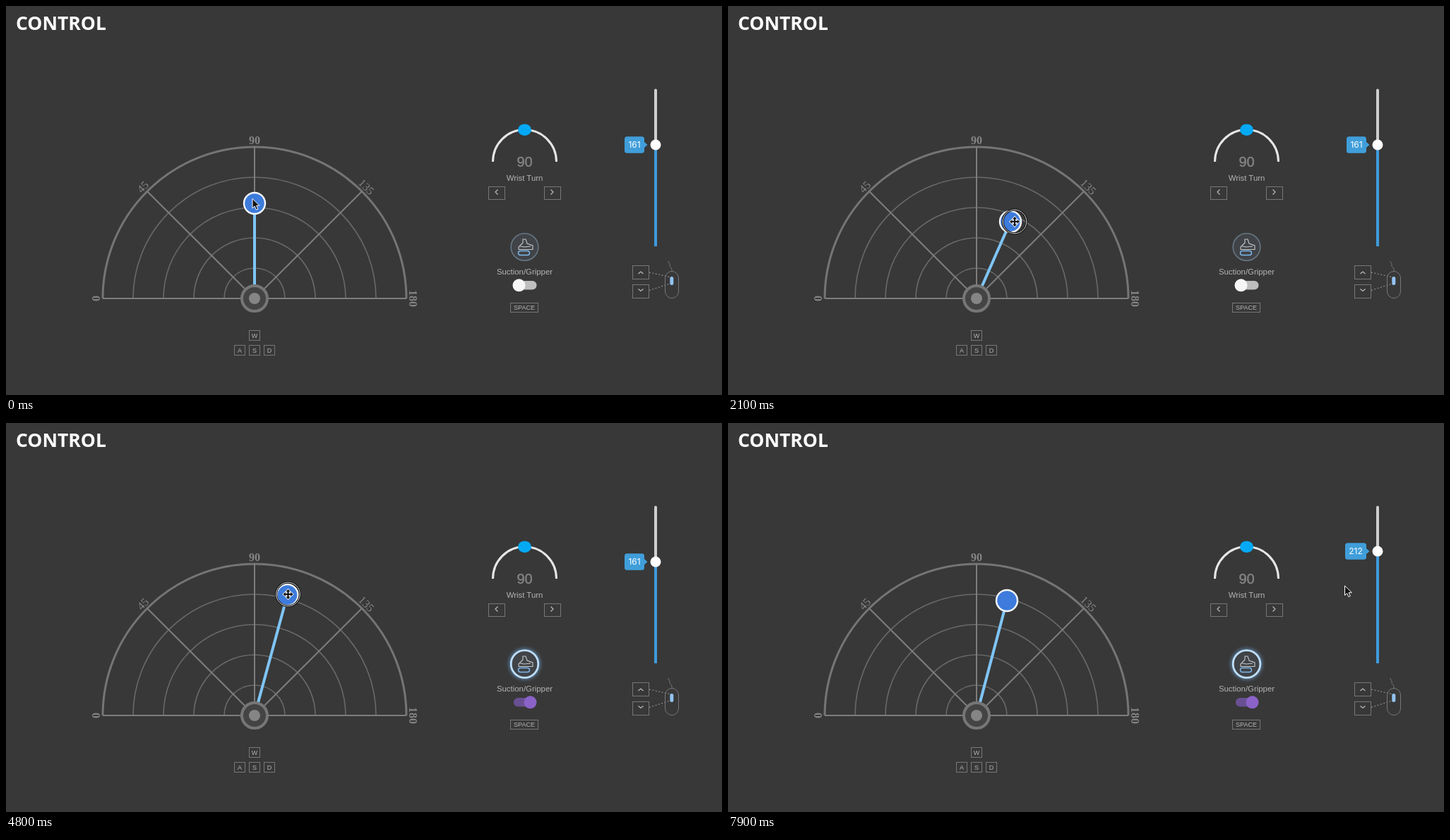
These frames come from a looping animation (1014x552 px, 8000 ms). An HTML page:

```html
<!DOCTYPE html>
<html lang="en">
<head>
<meta charset="utf-8">
<title>Control</title>
<style>
  html, body { margin: 0; width: 100%; height: 100%; overflow: hidden; background: #383838; }
  svg { display: block; width: 1014px; height: 552px; }
  text { text-anchor: middle; font-family: "Liberation Sans", Arial, sans-serif; fill: #b4b4b4; }
  .title { font: bold 26.5px "Open Sans", "Noto Sans", sans-serif; fill: #fff; text-anchor: start; }
  .degrees text { font: bold 16px "Liberation Serif", Times, serif; fill: #858585; }
  .label { font-size: 11.4px; }
  .key { font-size: 9px; }
  .line { fill: none; stroke: #777; }
  .chevron { fill: none; stroke: #bbb; stroke-width: 1.2; }
</style>
</head>
<body>
<svg viewBox="0 0 1014 552">
  <defs>
    <radialGradient id="backdrop" gradientUnits="userSpaceOnUse" r="1"
      gradientTransform="translate(540 395) scale(640 430)">
      <stop offset="0" stop-color="#4c4c4c"/>
      <stop offset=".25" stop-color="#494949"/>
      <stop offset=".57" stop-color="#414141"/>
      <stop offset="1" stop-color="#383838"/>
    </radialGradient>
    <filter id="glow" x="-50%" y="-50%" width="200%" height="200%">
      <feGaussianBlur stdDeviation="2.5"/>
    </filter>
  </defs>
  <rect width="1014" height="552" fill="url(#backdrop)"/>
  <text class="title" x="14" y="34">CONTROL</text>

  <g id="dial" class="line"></g>
  <g class="degrees">
    <text x="352" y="196">90</text>
    <text transform="translate(194 257) rotate(-45)" y="5" style="font-weight:400">45</text>
    <text transform="translate(510 257) rotate(45)" y="5" style="font-weight:400">135</text>
    <text transform="translate(128 415) rotate(-90)" y="5">0</text>
    <text transform="translate(576 415) rotate(90)" y="5">180</text>
  </g>
  <line id="arm" x1="352" y1="415" stroke="#7fc5f6" stroke-width="4"/>
  <circle cx="352" cy="415" r="18" fill="#444" stroke="#767676" stroke-width="4"/>
  <circle cx="352" cy="415" r="8" fill="#858585"/>
  <circle id="knob" r="15" fill="#3d7bdc" stroke="#f4f7fb" stroke-width="2.4"/>
  <g id="keys"></g>

  <path d="M689.5 221a45 45.5 0 0 1 90 0" fill="none" stroke="#e6e6e6" stroke-width="3"/>
  <ellipse cx="734.5" cy="175.7" rx="9.5" ry="8.3" fill="#04a9f6"/>
  <text x="734.5" y="228" font-size="20" style="fill:#858585" stroke="#858585" stroke-width=".4">90</text>
  <text class="label" x="734.5" y="247.5">Wrist Turn</text>
  <path class="chevron" d="M696.5 260.5l-3.5 3.5 3.5 3.5M771.5 260.5l3.5 3.5-3.5 3.5"/>

  <circle id="halo" cx="734.5" cy="342" r="20" fill="none" stroke="#78b4ee" stroke-width="4" filter="url(#glow)"/>
  <circle id="badge" cx="734.5" cy="342" r="19.3" fill="#404347"/>
  <path d="M726 346v-4l6-6v-5h4l2 6 8 3v5.500h-20M728 341l6 1 9-1" fill="none" stroke="#c9c9c9" stroke-width="1.1"/>
  <rect x="725.5" y="347.500" width="16" height="6" rx="3" fill="#404347" stroke="#7db9ee" stroke-width="1.4"/>
  <text class="label" x="734.5" y="381">Suction/Gripper</text>
  <rect id="track" y="390" width="31" height="12.500" rx="6.2"/>
  <circle id="thumb" cy="396.300" r="9"/>

  <path d="M920 119.500V339" stroke="#cfcfcf" stroke-width="4" stroke-linecap="round"/>
  <path id="level" stroke="#3f9bdc" stroke-width="4"/>
  <circle id="handle" cx="920" r="7.500" fill="#fff"/>
  <g id="bubble">
    <rect id="bubbleBox" y="-11.700" height="23.400" rx="3.500" fill="#409eda"/>
    <path d="M903.500-4.500l5 4.500-5 4.500z" fill="#409eda"/>
    <text id="value" y="4.400" style="font:12px Inter,Arial,sans-serif;fill:#fff"></text>
  </g>
  <path class="chevron" d="M895.500 380l3.500-3 3.500 3M895.500 401.500l3.500 3 3.500-3"/>
  <path d="M911 378l29 6.500M911 403.500l28-9" stroke="#a0a0a0" stroke-dasharray="2 2.500" fill="none"/>
  <rect class="line" x="933.500" y="376.500" width="19" height="38" rx="9.500"/>
  <path class="line" d="M943 376c1-5-4-5-3-9 1-3-3-2-2-5"/>
  <rect x="940.300" y="384" width="5" height="12" rx="2.500" fill="#92c3f2"/>

  <g id="ring" fill="none">
    <circle r="16.800" stroke="#111" stroke-width="3"/>
    <circle r="16.800" stroke="#ddd" stroke-width="1"/>
    <path d="M0-7l3 3.300H1.100v2.600h2.600V-3L7 0 3.700 3V1.100H1.100v2.600H3L0 7-3 3.700h1.900V1.100h-2.600V3L-7 0l3.300-3v1.900h2.600v-2.600H-3z"
      fill="#111" stroke="#fff" stroke-width="1.600" paint-order="stroke"/>
  </g>
  <path id="arrow" d="M0 0v13.500l3.200-2.900 2.200 5 2.400-1-2.200-4.900h4.300z" fill="#111" stroke="#fff" stroke-width="1"/>
</svg>
<script>
const LOOP = 8000, STEP = 100;
const $ = id => document.getElementById(id);
const set = (id, attrs) => {
  for (const name in attrs) $(id).setAttribute(name, attrs[name]);
};
const place = (id, x, y) => set(id, { transform: `translate(${x} ${y})` });
const show = (id, visible) => set(id, { visibility: visible ? "visible" : "hidden" });
const mix = (a, b, k) => a + (b - a) * k;
const clamp = k => Math.max(0, Math.min(1, k));

// Static dial and key caps
const arcs = [1, 2, 3, 4, 5].map(i => {
  const r = 43 * i;
  return `<path d="M${352 - r} 415a${r} ${r} 0 0 1 ${2 * r} 0" stroke="${i < 5 ? "#696969" : "#757575"}" stroke-width="${i < 5 ? 1.6 : 3}"/>`;
});
const spokes = [0, 45, 90, 135, 180].map(deg => {
  const a = deg * Math.PI / 180;
  return `<path d="M352 415L${352 - 215 * Math.cos(a)} ${415 - 215 * Math.sin(a)}" stroke="#7d7d7d" stroke-width="2"/>`;
});
$("dial").innerHTML = arcs.concat(spokes).join("");

const keyCap = (x, y, w, h, label = "") =>
  `<rect class="line" x="${x}" y="${y}" width="${w}" height="${h}"/>
   <text class="key" x="${x + w / 2}" y="${y + h / 2 + 3.3}">${label}</text>`;
$("keys").innerHTML = [
  [344.5, 460.5, 15, 14, "W"], [323.5, 481.5, 15, 14, "A"],
  [344.5, 481.5, 15, 14, "S"], [365.5, 481.5, 15, 14, "D"],
  [683.5, 256.5, 23, 18], [762.5, 256.5, 23, 18],
  [714.5, 421.5, 39, 13, "SPACE"],
  [887.5, 368.5, 23, 19], [887.5, 395.5, 23, 19]
].map(cap => keyCap(...cap)).join("");

// Each row: time, x, y
const knobPath = [
  [0, 352, 280], [400, 352, 280], [900, 322, 283], [1300, 299, 295],
  [1600, 281, 306], [1800, 297, 308], [2100, 400, 306], [2400, 412, 298],
  [2700, 404, 276], [3000, 402, 249], [3200, 402, 236], [4600, 402, 236], [5000, 395, 252]
];
const pointerPath = [
  [0, 352, 280], [400, 352, 280], [900, 320, 283], [1300, 298, 295],
  [1600, 280, 306], [1800, 298, 308], [2100, 406, 306], [2400, 413, 298],
  [2700, 404, 271], [3000, 403, 243], [3200, 404, 234], [4600, 404, 234], [5000, 395, 252]
];

function along(path, t) {
  const next = path.findIndex(p => p[0] > t);
  if (next < 0) return path.at(-1).slice(1);
  const [t0, x0, y0] = path[next - 1], [t1, x1, y1] = path[next];
  const k = (t - t0) / (t1 - t0);
  return [mix(x0, x1, k), mix(y0, y1, k)];
}

function drawSwitch(on) {
  const rgb = (a, b) => `rgb(${a.map((v, i) => Math.round(mix(v, b[i], on)))})`;
  set("track", { x: mix(720.5, 719, on), fill: rgb([190, 190, 190], [105, 80, 146]) });
  set("thumb", { cx: mix(726.5, 742.5, on), fill: rgb([246, 246, 246], [139, 98, 200]) });
  set("badge", { stroke: rgb([103, 119, 132], [190, 222, 252]), "stroke-width": mix(1.6, 2.8, on) });
  set("halo", { opacity: on * 0.65 });
}

function drawSlider(value) {
  const y = 197 - (value - 161) * 15 / 51;
  const ones = String(value).split("1").length - 1;
  const width = 32 - 2 * ones;
  set("level", { d: `M920 ${y}V341` });
  set("handle", { cy: y });
  place("bubble", 0, y);
  set("bubbleBox", { x: 904 - width, width });
  set("value", { x: 904 - width / 2 });
  $("value").textContent = value;
}

function draw(t) {
  const [x, y] = along(knobPath, t);
  set("knob", { cx: x, cy: y });
  set("arm", { x2: x, y2: y });

  const dragging = t >= 300 && t < 5100;
  show("ring", dragging);
  place("ring", ...along(pointerPath, t));
  show("arrow", t < 300 || t >= 6800);
  place("arrow", ...(t < 300 ? [349, 273.5] : [873.5, 231]));

  drawSwitch(clamp((t - 3200) / 200));
  drawSlider(Math.round(mix(161, 212, clamp((t - 6500) / 1000))));
}

function tick(now) {
  draw(Math.floor(now % LOOP / STEP) * STEP);
  requestAnimationFrame(tick);
}
draw(0);
requestAnimationFrame(tick);
</script>
</body>
</html>
```
